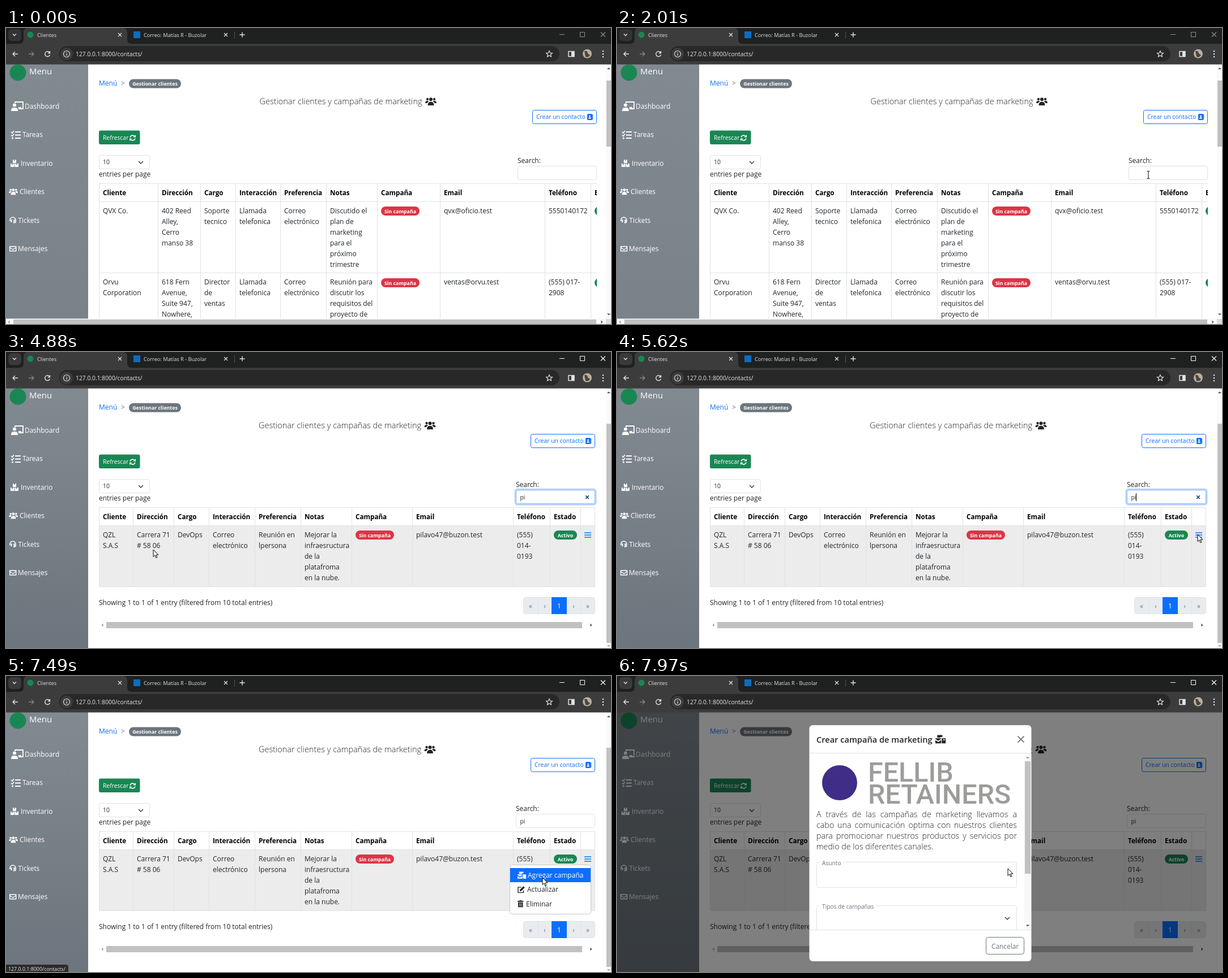
Animation, 1068 px wide and 524 px high, one loop 8 s. Source, as an HTML page:

```html
<!DOCTYPE html>
<html lang="es">
<head>
<meta charset="utf-8">
<title>Clientes</title>
<style>
html, body { margin: 0; width: 100%; height: 100%; overflow: hidden; background: #fff; }
svg { display: block; width: 1068px; height: 524px; }
svg, .para { font-family: 'Open Sans', 'Noto Sans', sans-serif; }
text { white-space: pre; }
.para { font-size: 14.3px; font-weight: 300; line-height: 18.9px; color: #212529; }
.para div { text-align: justify; text-align-last: justify; white-space: nowrap; }
.para div:last-child { text-align-last: left; }
</style>
</head>
<body>
<svg id="stage" viewBox="0 0 1068 524"></svg>
<script>
const INK = '#212529', BLUE = '#0d6efd', GREEN = '#198754', RED = '#dc3545', GRAY = '#6c757d', LINE = '#dee2e6';

const text = (x, y, s, { size = 12, fill = INK, weight = 400, anchor = 'start', more = '' } = {}) =>
  `<text x="${x}" y="${y}" font-size="${size}" fill="${fill}" font-weight="${weight}" text-anchor="${anchor}" ${more}>${s}</text>`;
const rect = (x, y, w, h, fill, r = 0, more = '') =>
  `<rect x="${x}" y="${y}" width="${w}" height="${h}" fill="${fill}" rx="${r}" ${more}/>`;
const box = (x, y, w, h, stroke, r = 3, fill = '#fff') => rect(x, y, w, h, fill, r, `stroke="${stroke}"`);
const circle = (x, y, r, fill) => `<circle cx="${x}" cy="${y}" r="${r}" fill="${fill}"/>`;
const shape = (d, fill) => `<path d="${d}" fill="${fill}"/>`;
const line = (d, stroke, w = 1) => `<path d="${d}" fill="none" stroke="${stroke}" stroke-width="${w}"/>`;
const group = (id, s, more = '') => `<g id="${id}" ${more}>${s}</g>`;
const at = (x, y, s, k = 1) => `<g transform="translate(${x} ${y}) scale(${k})">${s}</g>`;
const cross = (x, y, r, c, w) => line(`M${x - r} ${y - r}l${2 * r} ${2 * r}m0 ${-2 * r}l${-2 * r} ${2 * r}`, c, w);
const chevron = (x, y, c, r = 4) => line(`M${x - r} ${y - r / 2}l${r} ${r} ${r} ${-r}`, c, 1.4);
const pill = (x, y, w, s, fill) => rect(x, y, w, 16, fill, 8) +
  text(x + w / 2, y + 11.5, s, { size: 8.8, fill: '#fff', weight: 700, anchor: 'middle' });
// Small scrollbar arrow pointing up, down, left or right
const arrow = (x, y, dir, c = '#505050') =>
  `<path d="M-3 1.5L0-1.5 3 1.5z" fill="${c}" transform="translate(${x} ${y}) rotate(${{ up: 0, right: 90, down: 180, left: 270 }[dir]})"/>`;

const icons = {
  users: c => [[10, 3.3, 3], [4, 3, 2.2], [16, 3, 2.2]].map(a => circle(...a, c)).join('') +
    shape('M4.5 14q0-6.500 5.500-6.500t5.500 6.500zM0 10q0-4 3.500-4 2 0 3 1-2.500 1.500-3 3zM20 10q0-4-3.500-4-2 0-3 1 2.500 1.500 3 3z', c),
  board: c => line('M7 3V1H21V13H13', c, 1.8) + circle(6, 6.5, 3, c) + shape('M0 17q0-6 4-6h4q4 0 4 6zM13 10h5v3h-5z', c),
  tasks: c => line('M7 2h10M7 7.500h10M7 13h10', c, 2) + line('M0 2l2 2 3-4M0 7.500l2 2 3-4', c, 1.5) + circle(2.5, 13, 1.6, c),
  boxes: c => shape('M4 0h2v2h2V0h2v6H4zM0 7h2v2h2V7h2.500v6H0zM7.500 7h2v2h2V7H14v6H7.500z', c),
  headset: c => line('M1 8V6a5 5 0 0 1 10 0v3q0 2-4 2', c, 1.6) + shape('M2.500 5h2v5h-2zM7.500 5h2v5h-2z', c),
  mail: c => line('M.7.7h11v8H.7zM.7 2.500l5.500 4 5.500-4', c, 1.4),
  book: c => rect(0, 0, 9, 11, c, 1.5) + rect(9.3, 1, 1, 9, c) + circle(4.5, 4, 1.5, '#fff') + shape('M2 8.500q0-2.500 2.500-2.500t2.500 2.500z', '#fff'),
  sync: c => line('M1 4.500a4.700 4.700 0 0 1 8.500-1.200M10 6.500a4.700 4.700 0 0 1-8.500 1.200', c, 1.6) + shape('M11 0v4.600H6.400zM0 11V6.400h4.600z', c),
  bulk: c => shape('M0 5h9v1L4.500 9 0 6zM0 8l4.500 3L9 8v5H0zM3 0h8v3H8v1H3zM9 5h7v8h-6V5z', c) + rect(12.5, 6.5, 2, 2, '#fff'),
  edit: c => line('M7 2H1v10h10V8', c, 1.5) + shape('M4 9.500l.5-3L11 0l2.500 2.500L7 9z', c),
  trash: c => shape('M0 1h3l1-1h3l1 1h3v2H0zM1 4h9v9H1z', c) + line('M3.500 5.500v6m2-6v6m2-6v6', '#fff', .7)
};

function browser() {
  const c = '#e3e3e3', name = { size: 9.2, fill: c };
  return rect(0, 0, 1068, 64, '#1f2020') + rect(0, 28, 1068, 36.5, '#3c3c3c') +
    rect(4, 2, 23, 21, '#333', 6, 'id="tabButton"') + chevron(15, 12, c, 3) +
    shape('M23 28q8 0 8-8V8q0-8 8-8H206q8 0 8 8V20q0 8 8 8z', '#3c3c3c') +
    circle(43, 12, 5.5, GREEN) + text(55, 16, 'Clientes', name) + cross(201, 12, 3, c, 1.2) +
    rect(225, 6, 12, 12, '#0f6cbd') + text(243, 16, 'Correo: Matías R - Buzolar', name) + cross(388, 12, 3, c, 1.2) +
    line('M403.500 6v13', '#505050') + line('M412.500 12h9m-4.500-4.500v9', c, 1.4) +
    group('winButtons', line('M977 11.500h9M1013.500 7.500h8v8h-8z', '#fff') + cross(1054, 11.5, 4, '#fff', 1.1)) +
    line('M21 46h-9m4-4l-4 4 4 4', c, 1.4) + line('M40 46h9m-4-4l4 4-4 4', '#858585', 1.4) +
    line('M77 43.500a4.500 4.500 0 1 0 .5 4M77.500 41v3.500H74', c, 1.4) +
    rect(94, 32, 883, 27, '#282828', 13.5) + circle(107, 46, 11, '#3c3c3c') +
    line('M101.500 46a5.500 5.500 0 1 0 11 0a5.500 5.500 0 1 0-11 0M107 45v4M107 42.500v1.300', c, 1.2) +
    text(123, 49.5, '127.0.0.1:8000/contacts/', { size: 10.3, fill: '#e8e8e8' }) +
    line('M959 40.500l1.600 3.500 3.800.4-2.900 2.600.9 3.800-3.400-2-3.400 2 .9-3.800-2.900-2.600 3.800-.4z', c, 1.2) +
    line('M993 41.500h10v9h-10z', c, 1.5) + rect(998, 41, 5, 10, c) +
    circle(1026, 45.5, 8, '#b9b0a0') + shape('M1021 41q5-2 6 4l4 3q-3 5-8 3z', '#4d443c') +
    [41, 46, 51].map(y => circle(1054, y, 1.3, c)).join('');
}

function sidebar() {
  const items = [
    ['board', 9, 130, 33, 143, 'Dashboard'], ['tasks', 9, 182, 29, 193, 'Tareas'], ['boxes', 8, 233, 26, 244, 'Inventario'],
    ['users', 5, 284, 24, 294, 'Clientes', .8], ['headset', 6, 334, 21.5, 344.5, 'Tickets'], ['mail', 6, 386, 21, 395, 'Mensajes']];
  return rect(0, 64, 145, 460, 'url(#side)', 0, 'id="sideFill"') + circle(21, 79, 14.5, GREEN) +
    text(41, 82, 'Menu', { size: 14.9, fill: '#fff' }) +
    items.map(([icon, x, y, tx, ty, s, k]) => at(x, y, icons[icon]('#fff'), k) + text(tx, ty, s, { size: 11.9, fill: '#fff' })).join('');
}

function header() {
  return text(164, 102, 'Menú', { fill: BLUE }) + text(203, 102, '&gt;', { fill: GRAY }) +
    pill(217, 90.5, 92, 'Gestionar clientes', GRAY) +
    rect(164, 181.5, 72.5, 24.5, GREEN, 3) + text(171, 198, 'Refrescar', { size: 10.3, fill: '#fff' }) + at(218, 189, icons.sync('#fff')) +
    box(164.5, 225.5, 89, 24, LINE) + text(171, 241, '10', { size: 10.4 }) + chevron(238, 238, '#343a40') +
    text(164, 263, 'entries per page') +
    group('heading', text(589.5, 135, 'Gestionar clientes y campañas de marketing', { size: 14.5, weight: 300, anchor: 'middle' }) +
      at(738.5, 123, icons.users(INK)));
}

// Right-aligned controls, which shift with the page width
function controls() {
  return group('controls', box(926.5, 145.5, 113, 24, BLUE) +
    text(933, 161, 'Crear un contacto', { size: 10.4, fill: BLUE }) + at(1023, 152, icons.book(BLUE)) +
    text(900, 239, 'Search:') + box(900.5, 244.5, 139, 24, LINE) +
    group('ring', rect(899, 243, 142, 27, 'none', 4, 'stroke="#b9d5fe" stroke-width="3"') + box(900.5, 244.5, 139, 24, '#86b7fe')) +
    text(907.5, 261, '', { size: 10.4, more: 'id="query"' }) +
    group('clear', cross(1026, 257, 2.8, '#184a8c', 1.7)) +
    rect(0, 250, 1, 14, '#000', 0, 'id="caret"'));
}

function table(xs, ys, right, hoverId, heads, rows) {
  const last = ys[ys.length - 1];
  const cells = rows.map((row, r) => row.map((cell, i) => cell.split('|').map((s, j) =>
    text(xs[i] + 6.5, ys[r + 1] + 20.5 + 19 * j, s)).join('')).join('')).join('');
  return rect(xs[0], ys[1], right - xs[0], ys[2] - ys[1], '#ececec', 0, `id="${hoverId}"`) +
    line(xs.map(x => `M${x} ${ys[0]}V${last}`).join('') + ys.map(y => `M${xs[0]} ${y}H${right}`).join(''), LINE) +
    heads.map((s, i) => text(xs[i] + 6.5, ys[0] + 20.5, s, { size: 11.7, weight: 700, fill: '#000' })).join('') + cells;
}

const HEADS = ['Cliente', 'Dirección', 'Cargo', 'Interacción', 'Preferencia', 'Notas', 'Campaña', 'Email', 'Teléfono', 'Estado'];

function fullView() {
  const rows = [
    ['QVX Co.', '402 Reed|Alley,|Cerro|manso 38', 'Soporte|tecnico', 'Llamada|telefonica', 'Correo|electrónico',
      'Discutido el|plan de|marketing|para el|próximo|trimestre', '', 'qvx@oficio.test', '5550140172'],
    ['Orvu|Corporation', '618 Fern|Avenue,|Suite 947,|Nowhere,', 'Director|de|ventas', 'Llamada|telefonica', 'Correo|electrónico',
      'Reunión para|discutir los|requisitos del|proyecto de', '', 'ventas@orvu.test', '(555) 017-|2908']];
  const status = [316, 443].map(y => pill(662, y, 68, 'Sin campaña', RED) + rect(1039, y, 41, 16, GREEN, 8)).join('');
  return `<g clip-path="url(#page)">` +
    table([164.5, 268.5, 343.5, 405.5, 484.5, 565.5, 655.5, 766.5, 951.5, 1032.5], [275.5, 307.5, 433.5, 560], 1044, 'hoverA', HEADS, rows) +
    status + '</g>' +
    rect(0, 514.5, 1068, 9.5, '#fafafa') + rect(13, 516, 1029, 8, '#c1c1c1') + arrow(5, 520.5, 'left', '#a0a0a0') + arrow(1052, 520.5, 'right') +
    rect(1059, 64, 9, 451, '#fafafa') + rect(1060, 93, 8, 117, '#c1c1c1') + arrow(1064, 71.5, 'up') + arrow(1064, 507, 'down') +
    rect(1059, 515, 9, 9, '#dcdcdc');
}

function filteredView() {
  const row = ['QZL|S.A.S', 'Carrera 71|# 58 06', 'DevOps', 'Correo|electrónico', 'Reunión en|lpersona',
    'Mejorar la|infraesructura|de la|platafroma|en la nube.', '', 'pilavo47@buzon.test', '(555)|014-|0193'];
  const pages = [['«', 913], ['‹', 939], ['1', 963], ['›', 990], ['»', 1014]];
  return table([164.5, 224.5, 296.5, 358.5, 439.5, 520.5, 610.5, 717.5, 895.5, 960.5, 1014.5, 1039.5], [275.5, 307.5, 415.5], 1039.5, 'hoverB', HEADS, [row]) +
    pill(617, 316, 68, 'Sin campaña', RED) + pill(967, 316, 41, 'Activo', GREEN) +
    line('M1021 320h12m-12 4h12m-12 4h12', BLUE, 1.7) +
    text(164, 448, 'Showing 1 to 1 of 1 entry (filtered from 10 total entries)') +
    box(913.5, 434.5, 126, 29, LINE, 4, '#e9ecef') + line('M939.500 435v29M1014.500 435v29', LINE) + rect(963, 434, 27, 30, BLUE) +
    pages.map(([s, x], i) => text((x + (pages[i + 1] || [0, 1040])[1]) / 2, 454, s, { fill: s == '1' ? '#fff' : GRAY, anchor: 'middle' })).join('') +
    rect(177, 478, 840, 11, '#c1c1c1') + arrow(170, 483.5, 'left', '#a0a0a0') + arrow(1033, 483.5, 'right') +
    group('pageBar', rect(1059, 64, 9, 460, '#fafafa') + rect(1060, 127, 8, 388, '#c1c1c1') + arrow(1064, 71.5, 'up') + arrow(1064, 520.5, 'down', '#a0a0a0'));
}

function menu() {
  const entries = [['bulk', 346.5, 921, 357, 'Agregar campaña'], ['edit', 372, 920, 382, 'Actualizar'], ['trash', 397, 918, 408, 'Eliminar']];
  const entry = ([icon, y, tx, ty, s], c) => at(903, y, icons[icon](c), .95) + text(tx, ty, s, { fill: c });
  return group('menu', box(889.5, 334.5, 143, 87, '#c8c8c8', 4) + rect(890, 340, 142, 25, '#f8f9fa', 0, 'id="menuHover"') +
    entries.map(e => entry(e, INK)).join('') +
    group('pressed', rect(890, 340, 142, 25, BLUE) + entry(entries[0], '#fff')));
}

function modal() {
  const label = (y, w, s) => rect(358, y - 9, w, 12, '#fff') + text(362, y, s, { size: 10.2, fill: GRAY });
  const word = (y, s) => text(443, y, s, { size: 48.5, weight: 500, fill: '#9c9c9a', more: 'font-family="Roboto, sans-serif"' });
  const lines = ['A través de las campañas de marketing llevamos a', 'cabo una comunicación optima con nuestros clientes',
    'para promocionar nuestros productos y servicios por', 'medio de los diferentes canales.'];
  return group('modal', rect(339.5, 87, 392, 418, '#fff', 6) +
    text(352, 118, 'Crear campaña de marketing', { size: 14.6, weight: 600 }) + at(562, 104.5, icons.bulk(INK), 1.13) +
    cross(713, 112, 5.5, '#666', 1.6) +
    circle(393, 189, 31, '#3f2d87') + word(187, 'FELLIB') + word(226, 'RETAINERS') +
    `<foreignObject x="352" y="236" width="354" height="80"><div class="para">${lines.map(s => `<div>${s}</div>`).join('')}</div></foreignObject>` +
    box(352.5, 329.5, 353, 45, LINE) + label(334.5, 43, 'Asunto') +
    line('M352.500 449V409.500q0-3 3-3H702.500q3 0 3 3V449', LINE) + label(411.5, 99, 'Tipos de campañas') + chevron(689, 429, '#343a40') +
    rect(719, 137, 12, 312, '#f8f8f8') + rect(720, 151, 10, 199, '#c1c1c1') + arrow(725, 144, 'up', '#909090') + arrow(725, 442, 'down') +
    line('M340 136.500H731M340 449.500H731', LINE) +
    box(651.5, 462.5, 67, 30, GRAY, 4) + text(685, 483, 'Cancelar', { size: 11.9, fill: GRAY, anchor: 'middle' }));
}

const gradient = (id, end) => `<linearGradient id="${id}" x2="0" y2="1"><stop stop-color="#828a91"/><stop offset="1" stop-color="${end}"/></linearGradient>`;

document.getElementById('stage').innerHTML =
  `<defs>${gradient('side', '#6c757d')}${gradient('sideLong', '#7a8289')}<clipPath id="page"><rect width="1043" height="514.5"/></clipPath></defs>` +
  rect(0, 0, 1068, 524, '#fff') + sidebar() + header() + group('full', fullView()) + group('filtered', filteredView()) +
  controls() + menu() +
  group('status', shape('M0 511H106q4 0 4 4V524H0z', '#2b2b2b') + text(4, 522, '127.0.0.1:8000/contacts/', { size: 8.85, fill: '#e8e8e8' })) +
  rect(0, 64, 1068, 460, '#000', 0, 'id="backdrop"') + modal() + browser() +
  group('cursor', group('pointer', `<path d="M0 0V12.500l2.900-2.700 2 4.700 2-.9-2-4.500h4z" fill="#fff" stroke="#000"/>`) +
    group('beam', line('M-2.500-6.500h2l.5.500.5-.500h2M0-6V6M-2.500 6.500h2l.5-.500.5.500h2', '#000')));

const $ = id => document.getElementById(id);
const show = (id, on) => $(id).style.display = on ? '' : 'none';
const fade = (id, v) => $(id).style.opacity = v;
const ramp = (t, a, b) => Math.min(1, Math.max(0, (t - a) / (b - a)));

// time, x, y of the mouse
const path = [[250, 725, 395], [690, 725, 395], [1110, 859, 278], [1460, 938, 260], [4060, 938, 260], [4350, 850, 318],
  [4880, 259, 350], [5620, 1025, 323], [6200, 1025, 320], [6550, 1025, 320], [6690, 945, 358], [6890, 945, 358],
  [7030, 947, 357], [7770, 947, 357], [7970, 690, 341]];

function mouse(t) {
  const i = path.findIndex(p => p[0] > t);
  if (i < 1) return path[i ? path.length - 1 : 0].slice(1);
  const [a, b] = [path[i - 1], path[i]], k = ramp(t, a[0], b[0]);
  return [1, 2].map(n => a[n] + (b[n] - a[n]) * k);
}

function draw(t) {
  const filtered = t >= 3120, active = t >= 2050, focus = active && t < 5690;
  const query = t < 3120 ? '' : t < 3180 ? 'p' : 'pi';
  show('full', !filtered);
  show('filtered', filtered);
  show('pageBar', t < 7570);
  $('sideFill').setAttribute('fill', filtered ? 'url(#side)' : 'url(#sideLong)');
  $('controls').setAttribute('transform', `translate(${filtered ? 0 : 3} 0)`);
  $('heading').setAttribute('transform', `translate(${filtered ? 0 : 1.5} 0)`);
  show('hoverA', t >= 250 && t < 1250);
  show('hoverB', t >= 4340);
  fade('winButtons', active ? 1 : .5);
  $('tabButton').setAttribute('fill', active ? '#3a3a3a' : '#333');

  fade('ring', ramp(t, 2010, 2240) * (1 - ramp(t, 5690, 5840)));
  $('query').textContent = query;
  show('clear', query && focus);
  const blink = Math.max(0, t - (filtered ? 3200 : 2170));
  show('caret', focus && Math.floor(blink / 530) % 2 == 0);
  $('caret').setAttribute('x', [907, 913.5, 916][query.length]);

  show('menu', t >= 5760 && t < 7570);
  show('menuHover', t >= 6620);
  show('pressed', t >= 7420);
  show('status', t >= 6890 && t < 7900);
  fade('backdrop', .5 * ramp(t, 7500, 7570));
  fade('modal', ramp(t, 7700, 7830));

  const [x, y] = mouse(t), beam = t >= 1500 && t < 4100;
  show('cursor', t >= 250);
  show('beam', beam);
  show('pointer', !beam);
  $('cursor').setAttribute('transform', `translate(${x} ${y})`);
}

const start = performance.now();
function tick() {
  draw((performance.now() - start) % 8000);
  requestAnimationFrame(tick);
}
tick();
</script>
</body>
</html>
```
